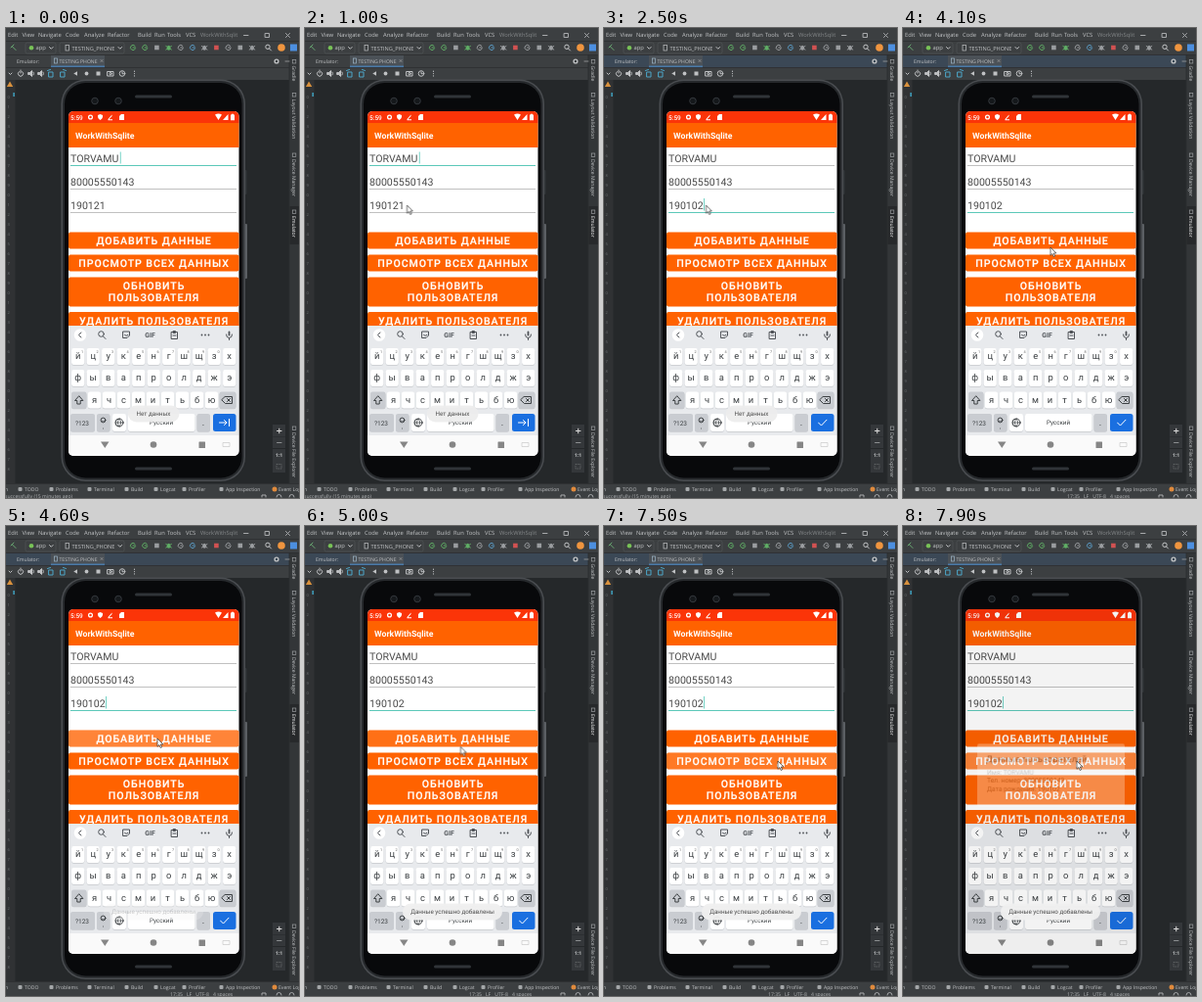
These frames come from a looping animation (300x480 px, 8 s). An HTML page:

```html
<!DOCTYPE html>
<html lang="ru">
<head>
<meta charset="utf-8">
<title>Emulator</title>
<style>
html, body { margin: 0; width: 100%; height: 100%; overflow: hidden; background: #25282a; }
svg { display: block; width: 100vw; height: 100vh; }
text { text-rendering: geometricPrecision; white-space: pre; }
.ide { font: 5.8px "Open Sans", "Noto Sans", sans-serif; fill: #c3c5c7; }
.small { font-size: 5.1px; }
.app { font-family: Roboto, sans-serif; }
.field { font-size: 10.6px; fill: #4a4a4a; }
.btn { font-size: 10.6px; font-weight: 500; letter-spacing: .0893em; fill: #fff; stroke: #fff; stroke-width: .2; text-anchor: middle; }
.key { font-size: 9.4px; fill: #3c4043; text-anchor: middle; }
.hint { font-size: 3.8px; fill: #666; text-anchor: middle; }
.toast { font-size: 6.3px; fill: #444; text-anchor: middle; }
.line { fill: none; stroke-width: 1; stroke-linecap: round; stroke-linejoin: round; }

.anim, .anim * { animation-duration: 8s; animation-iteration-count: infinite; }
.step { animation-timing-function: step-end; }
#date1 { animation-name: date1; }
#date2 { animation-name: date2; }
#date3 { animation-name: date3; }
#date4 { animation-name: date4; }
#date5 { animation-name: date5; }
@keyframes date1 { 0% { opacity: 1 } 20%, 100% { opacity: 0 } }
@keyframes date2 { 0% { opacity: 0 } 20% { opacity: 1 } 22.5%, 100% { opacity: 0 } }
@keyframes date3 { 0% { opacity: 0 } 22.5% { opacity: 1 } 28.75%, 100% { opacity: 0 } }
@keyframes date4 { 0% { opacity: 0 } 28.75% { opacity: 1 } 31.25%, 100% { opacity: 0 } }
@keyframes date5 { 0% { opacity: 0 } 31.25%, 100% { opacity: 1 } }

/* focus moves from the first field to the third */
.before { animation-name: before; }
.after { animation-name: after; }
@keyframes before { 0% { opacity: 1 } 13.75%, 100% { opacity: 0 } }
@keyframes after { 0% { opacity: 0 } 13.75%, 100% { opacity: 1 } }

#nameCaret { animation-name: nameBlink; }
@keyframes nameBlink { 0%, 12.5% { opacity: 1 } 6.25%, 13.75%, 100% { opacity: 0 } }
#dateCaret { animation-name: dateBlink; }
@keyframes dateBlink {
  0%, 37.5%, 50%, 62.5%, 75%, 87.5% { opacity: 0 }
  13.75%, 43.75%, 56.25%, 68.75%, 81.25%, 93.75%, 100% { opacity: 1 }
}
#dateCaret rect { animation-name: caretMove; animation-timing-function: step-end; }
@keyframes caretMove {
  0% { transform: none }
  20% { transform: translateX(-6px) }
  22.5% { transform: translateX(-12px) }
  28.75% { transform: translateX(-6px) }
  31.25%, 100% { transform: none }
}

.smooth { animation-timing-function: linear; }
#press1 { animation-name: press1; }
#press2 { animation-name: press2; }
@keyframes press1 { 0%, 52.5% { opacity: 0 } 56.25%, 58.75% { opacity: .22 } 65%, 100% { opacity: 0 } }
@keyframes press2 { 0%, 91.25% { opacity: 0 } 95%, 100% { opacity: .22 } }
#toast1 { animation-name: toast1; }
#toast2 { animation-name: toast2; }
@keyframes toast1 { 0%, 39% { opacity: .94 } 46%, 100% { opacity: 0 } }
@keyframes toast2 { 0%, 56% { opacity: 0 } 61.5%, 100% { opacity: .95 } }
#dim { animation-name: dim; }
#dialog { animation-name: dialog; transform-origin: 152px 254px; }
@keyframes dim { 0%, 96.25% { opacity: 0 } 100% { opacity: .07 } }
@keyframes dialog { 0%, 96.25% { opacity: 0; transform: scale(.96) } 100% { opacity: .42; transform: none } }

#cursor { animation-name: cursor; animation-timing-function: ease-in-out; }
@keyframes cursor {
  0%, 1.25% { transform: translate(303px, 402px) }
  11.25%, 37.5% { transform: translate(104.5px, 181px) }
  46.25%, 51.25% { transform: translate(151px, 224px) }
  53.75%, 60% { transform: translate(155px, 217px) }
  66.25%, 77.5% { transform: translate(168px, 242px) }
  81.25%, 100% { transform: translate(178px, 240px) }
}
#status1 { animation-name: status1; }
#status2 { animation-name: status2; }
@keyframes status1 { 0% { opacity: 1 } 48.75%, 100% { opacity: 0 } }
@keyframes status2 { 0% { opacity: 0 } 48.75%, 100% { opacity: 1 } }
</style>
</head>
<body>
<svg viewBox="0 0 300 480" preserveAspectRatio="none" class="anim">
  <!-- IDE window -->
  <rect width="300" height="480" fill="#3c3f41"/>
  <rect y="53" width="290" height="412" fill="#25282a"/>
  <rect y="53" width="9" height="412" fill="#303234"/>
  <rect x="290" y="27" width="10" height="438" fill="#333638"/>
  <rect class="after step" y="27.500" width="290" height="13" fill="#3b4856"/>
  <path d="M0 13.500H300M0 27.500H300M0 40.500H290M9.500 53V465M290 27V465M0 465.500H300" stroke="#2c2e30" fill="none" stroke-width=".8"/>
  <rect x="290.500" y="182" width="9.500" height="39" fill="#27292b"/>
  <g id="menu" class="ide"></g>
  <path class="line" stroke="#a9abad" stroke-width=".6" d="M243.500 7.500h4.500M265.500 5.500h4v4h-4zM286.500 5.500l4 4M290.500 5.500l-4 4"/>

  <g class="ide">
    <path class="line" stroke="#6aab73" stroke-width="1.400" d="M10 22.500l-3.500-3.500M5 20l3-3"/>
    <rect x="20" y="15" width="31" height="11" rx="1.500" fill="none" stroke="#565a5c" stroke-width=".6"/>
    <circle cx="26" cy="20.300" r="2.300" fill="#78c257"/>
    <text x="30.500" y="22.300">app</text>
    <rect x="55" y="15" width="66" height="11" rx="1.500" fill="none" stroke="#565a5c" stroke-width=".6"/>
    <rect x="61" y="17.500" width="3.400" height="5.500" fill="none" stroke="#c3c5c7" stroke-width=".7"/>
    <text x="67.500" y="22.500" font-size="5.600">TESTING_PHONE</text>
    <path class="line" stroke="#c3c5c7" stroke-width=".8" d="M44.500 19.500l1.800 1.800l1.800-1.800M115 19.500l1.800 1.800l1.800-1.800"/>
  </g>
  <g id="tools"></g>
  <circle cx="282" cy="20" r="3.800" fill="#f0953f"/>
  <rect x="291" y="16.500" width="7" height="7" fill="#4c8fe0"/>

  <g class="ide small">
    <text x="11" y="35.500">Emulator:</text>
    <rect x="46" y="28" width="55" height="12" fill="#4b5157"/>
    <rect x="46" y="38.500" width="55" height="1.600" fill="#4a7aa8"/>
    <rect x="49.500" y="31" width="3" height="5" fill="none" stroke="#9fb7c8" stroke-width=".7"/>
    <text x="54.500" y="35.500">TESTING PHONE</text>
    <path class="line" stroke="#8b8d8f" stroke-width=".6" d="M97 32.500l2 2M99 32.500l-2 2M286 34h4"/>
    <circle cx="277" cy="34" r="1.900" fill="none" stroke="#bfc1c3" stroke-width="1.400"/>
  </g>
  <g class="line" stroke="#bfc1c3" stroke-width=".8">
    <path d="M3 46l1.500 1.500l1.500-1.500M13.500 44.500a2.600 2.600 0 1 0 3 0M15 43v3"/>
    <path fill="#bfc1c3" d="M23 45.500h1.500l2-2v6l-2-2H23zM33 45.500h1.500l2-2v6l-2-2H33z"/>
    <path d="M28 45q1 1.500 0 3M38 45q1 1.500 0 3"/>
    <path stroke="#4ca6c8" d="M44 45h4v5h-4zM42.500 43.500l3-1M56 45h4v5h-4zM61.500 43.500l-3-1"/>
    <path fill="#bfc1c3" stroke="none" d="M73 44.300l-3.800 2.200l3.800 2.200zM92.500 44.500h4v4h-4z"/>
    <circle cx="82.500" cy="46.500" r="1.900" fill="#bfc1c3" stroke="none"/>
    <path d="M104 44.500h6v4.500h-6z"/><circle cx="107" cy="46.700" r="1.200"/>
    <circle cx="119" cy="46.500" r="2.800"/><path d="M119 45v1.700h1.500"/>
    <path stroke-width="1.200" d="M131.500 44.200v.1M131.500 46.500v.1M131.500 48.800v.1"/>
  </g>

  <g id="gutter" class="ide" style="font-size:4px"></g>
  <path d="M4 54.500l3.200 5.500h-6.400z" fill="#d9913d"/>
  <rect x="7.200" y="66" width="1.800" height="4" fill="#3c8fa8"/>
  <g id="side" class="ide small"></g>
  <g class="ide" text-anchor="middle">
    <path fill="#34373a" d="M273 405h13v12.500h-13zM273 418h13v11h-13zM273 430h13v24h-13z"/>
    <path class="line" stroke="#ddd" d="M277.500 411.500h4.500M279.750 409.200v4.600"/>
    <path class="line" stroke="#8c8f91" d="M277.500 423.500h4.500"/>
    <text x="279.500" y="438" font-size="5" font-weight="700">1:1</text>
    <rect x="277" y="445.500" width="5" height="4.500" fill="none" stroke="#777a7c" stroke-width=".7" stroke-dasharray="1.300 1"/>
  </g>
  <g id="bottom" class="ide small"></g>
  <g class="ide small">
    <text id="status1" class="step" x="-1" y="480" fill="#b4b6b8">successfully (15 minutes ago)</text>
    <text id="status2" class="step" x="168" y="480" fill="#b4b6b8">17:35   LF   UTF-8   4 spaces</text>
    <path class="line" stroke="#a9abad" stroke-width=".8" d="M262 479v-2h4v2M277 479a2.500 2.500 0 0 1 5 0M290 479a2.500 2.500 0 0 1 5 0"/>
  </g>

  <!-- phone -->
  <rect x="244" y="145" width="2.500" height="25" rx="1" fill="#33373a"/>
  <rect x="244.500" y="200" width="2.500" height="56" rx="1" fill="#5b5f63"/>
  <rect x="56.500" y="52.500" width="188.500" height="410.500" rx="25" fill="#4a4d51"/>
  <rect x="58" y="54" width="185.500" height="407.500" rx="23.500" fill="#26292c"/>
  <rect x="60" y="56" width="181.500" height="403.500" rx="21.500" fill="#08090b"/>
  <g fill="#15181b" stroke="#34383d">
    <circle cx="91" cy="74.500" r="3.300"/><circle cx="115" cy="74.500" r="3.300"/>
  </g>
  <g fill="#303438">
    <rect x="132" y="68.500" width="38" height="3" rx="1.500"/>
    <rect x="132" y="448.500" width="38" height="3" rx="1.500"/>
  </g>
  <clipPath id="screen"><rect x="64" y="85" width="174.500" height="352" rx="5"/></clipPath>

  <g class="app" clip-path="url(#screen)">
    <rect x="64" y="85" width="175" height="352" fill="#fff"/>
    <rect x="64" y="85" width="175" height="12" fill="#fb3408"/>
    <rect x="64" y="97" width="175" height="25" fill="#ff6200"/>
    <text x="66" y="93.600" font-size="6.500" font-weight="500" fill="#fff">5:59</text>
    <g fill="#fff">
      <circle cx="86.500" cy="91" r="1.900" fill="none" stroke="#fff" stroke-width="1.300"/>
      <path d="M96.500 88l2.500 1v2q-.5 2-2.500 3q-2-1-2.500-3v-2zM104.500 93l4-4.500v1.500l-3 3.300h3.500v1h-4.500zM116 90l2-2h3v6h-5z"/>
      <path d="M214 88.500q3.500-2 7 0l-3.500 5.500zM227.500 88v6h-5.500zM230 88.500h1v-.8h2v.8h1v5.700h-4z"/>
    </g>
    <text x="71" y="112.500" font-size="8.700" font-weight="700" fill="#fff">WorkWithSqlite</text>

    <path d="M66 140.500H236M66 164.500H236M66 188.500H236" stroke="#b0b0b0" stroke-width=".8"/>
    <g stroke="#52c9b8" stroke-width=".9">
      <path class="before step" d="M66 140.500H236"/>
      <path class="after step" d="M66 188.500H236"/>
    </g>
    <g class="field">
      <text x="66" y="137">TORVAMU</text>
      <text x="66" y="160.700">80005550143</text>
      <text id="date1" class="step" x="66" y="184.500">190121</text>
      <text id="date2" class="step" x="66" y="184.500">19012</text>
      <text id="date3" class="step" x="66" y="184.500">1901</text>
      <text id="date4" class="step" x="66" y="184.500">19010</text>
      <text id="date5" class="step" x="66" y="184.500">190102</text>
    </g>
    <g fill="#52c9b8">
      <rect id="nameCaret" class="step" x="116.800" y="126.500" width=".8" height="12"/>
      <g id="dateCaret" class="step"><rect x="102.200" y="174" width=".8" height="12.500"/></g>
    </g>

    <g fill="#ff6200">
      <rect x="64" y="208.500" width="174.500" height="17" rx="2"/>
      <rect x="64" y="231.500" width="174.500" height="17" rx="2"/>
      <rect x="64" y="254.500" width="174.500" height="30" rx="2"/>
      <rect x="64" y="290" width="174.500" height="17" rx="2"/>
    </g>
    <rect id="press1" class="smooth" x="64" y="208.500" width="174.500" height="17" rx="2" fill="#fff" opacity="0"/>
    <rect id="press2" class="smooth" x="64" y="231.500" width="174.500" height="17" rx="2" fill="#fff" opacity="0"/>
    <g class="btn">
      <text x="151.600" y="221">ДОБАВИТЬ ДАННЫЕ</text>
      <text x="151.600" y="244">ПРОСМОТР ВСЕХ ДАННЫХ</text>
      <text x="151.600" y="266.700">ОБНОВИТЬ</text>
      <text x="151.600" y="279">ПОЛЬЗОВАТЕЛЯ</text>
      <text x="151.600" y="302.800">УДАЛИТЬ ПОЛЬЗОВАТЕЛЯ</text>
    </g>

    <!-- keyboard -->
    <rect x="64" y="304" width="175" height="112" fill="#e8eaed"/>
    <circle cx="76" cy="313.500" r="6.300" fill="#fff"/>
    <g class="line" stroke="#4d5156">
      <path d="M77 311l-2.500 2.500l2.500 2.500M99.500 315l2.500 2.500"/>
      <circle cx="97.500" cy="312.500" r="2.800"/>
      <path d="M120 310h6.500v4l-2.500 2.500h-4zM121.500 313.500q1.500 2 3.500 0M169.500 310.500h6v7h-6zM171.500 309.500h2v2h-2zM171 314h3"/>
      <path stroke-width="1.800" d="M200.500 313.500v.1M204 313.500v.1M207.500 313.500v.1M228.500 310.500v3"/>
      <path d="M225.500 313q0 3.500 3 3.500t3-3.500M228.500 316.500v2"/>
    </g>
    <text x="147.500" y="316" font-size="6.800" font-weight="700" fill="#4d5156" text-anchor="middle">GIF</text>
    <g id="keys"></g>
    <g class="line" stroke="#3c4043">
      <path d="M74.500 376l-4 4.500h2.300v3.500h3.400v-3.500h2.300zM224.500 376.500h7v7h-7l-3.500-3.500zM226.500 378.500l3 3M229.500 378.500l-3 3"/>
      <circle cx="99.500" cy="400.500" r="2.400"/><path stroke-width=".7" d="M98.300 401.300q1.200 1 2.400 0"/>
      <circle cx="116" cy="403" r="4"/><path stroke-width=".7" d="M112 403h8M116 399q-3.500 4 0 8M116 399q3.500 4 0 8"/>
    </g>
    <g class="key">
      <text x="78" y="405.500" font-size="6.500">?123</text>
      <text x="99.500" y="408.500" font-size="6">,</text>
      <text x="159" y="405.300" font-size="6.300">Русский</text>
      <text x="202" y="406">.</text>
    </g>
    <rect x="212" y="394" width="23.500" height="18" rx="2.500" fill="#1a6fe0"/>
    <g class="line" stroke="#fff" stroke-width="1.300">
      <path class="before step" d="M218.500 403h7.500M223.500 400.500l2.500 2.500l-2.500 2.500M228.500 399.500v7"/>
      <path class="after step" d="M219.500 403l3 3l5.500-5.800"/>
    </g>
    <rect x="64" y="416" width="175" height="21" fill="#fafafa"/>
    <g fill="#868686">
      <path d="M97 422.500h8.500l-4.250 6.500z"/><circle cx="151" cy="425.500" r="3.300"/><rect x="197.500" y="422.500" width="6.500" height="6.500" rx=".5"/>
    </g>
    <path d="M222 423.500h7v4h-7z" fill="none" stroke="#d0d0d0" stroke-width=".8"/>

    <rect id="dim" class="smooth" x="64" y="85" width="175" height="352" opacity="0"/>
    <g id="dialog" class="smooth" opacity="0">
      <rect x="75" y="222" width="153" height="65" rx="2" fill="#fff"/>
      <g font-size="6.800" fill="#555">
        <text x="84" y="240.500" font-size="9.400" font-weight="500" fill="#222">Данные пользователей</text>
        <text x="85" y="253.500">Имя: TORVAMU</text>
        <text x="85" y="262">Тел. номер: 80005550143</text>
        <text x="85" y="270.500">Дата рождения: 190102</text>
      </g>
    </g>

    <g id="toast1" class="toast smooth">
      <rect x="125" y="385.500" width="52.500" height="17" rx="8.500" fill="#ededed"/>
      <text x="151" y="396.200">Нет данных</text>
    </g>
    <g id="toast2" class="toast smooth" opacity="0">
      <rect x="100" y="385.500" width="102" height="17" rx="8.500" fill="#f0f0f0"/>
      <text x="151" y="396.300">Данные успешно добавлены</text>
    </g>
  </g>

  <path id="cursor" d="M0 0v8.300l1.900-1.800l1.300 3l1.400-.6l-1.300-2.900h2.600z" fill="#fff" stroke="#333" stroke-width=".7"/>
</svg>

<script>
const put = (id, html) => { document.getElementById(id).innerHTML = html; };
const label = (x, y, s, extra = '') => `<text x="${x}" y="${y}" ${extra}>${s}</text>`;

const menu = { Edit: 2, View: 16.5, Navigate: 33, Code: 61, Analyze: 80, Refactor: 104,
  Build: 135, Run: 152, Tools: 165, VCS: 184 };
put('menu', Object.entries(menu).map(([s, x]) => label(x, 9.3, s)).join('') +
  label(199, 9.3, 'WorkWithSqlit', 'fill="#85888a"'));

const ring = (x, c) => `<path class="line" d="M${x + 2} 18.2a2.6 2.6 0 1 0 .5 2.800M${x} 20h2.500" stroke="${c}"/>`;
const bug = (x, c) => `<ellipse cx="${x}" cy="20.3" rx="1.8" ry="2.500" fill="${c}"/>` +
  `<path class="line" d="M${x - 2.8} 18.500l5.600 3.600M${x + 2.8} 18.500l-5.600 3.600" stroke="${c}" stroke-width=".7"/>`;
const stop = (x, c) => `<rect x="${x - 2.3}" y="17.700" width="4.600" height="4.600" fill="${c}"/>`;
const green = '#5fad65', grey = '#9a9da0';
const tools = [[ring, green], [ring, green], [stop, grey], [bug, green], [ring, grey], [ring, '#5a9bc4'],
  [bug, grey], [stop, '#d25252'], [ring, grey], [stop, grey], [bug, grey]];
put('tools', tools.map(([draw, color], i) => draw(130 + i * 12.2, color)).join('') +
  '<path class="line" stroke="#c3c5c7" d="M269.500 21l2 2"/><circle cx="268" cy="19.300" r="2.200" fill="none" stroke="#c3c5c7"/>');

put('gutter', Array.from({ length: 39 }, (_, i) =>
  label(1.5, 72 + i * 10, i % 10, 'fill="#6c7073"')).join(''));

const side = { Gradle: 38.5, 'Layout Validation': 72.5, 'Device Manager': 134, Emulator: 192, 'Device File Explorer': 413 };
put('side', Object.entries(side).map(([s, y]) =>
  `<g transform="translate(293.300 ${y}) rotate(90)">` +
  label(0, 0, s, s === 'Emulator' ? 'fill="#fff"' : '') +
  '<rect x="-6" y="-3.500" width="3.500" height="3.500" fill="none" stroke="#9a9da0" stroke-width=".7"/></g>').join(''));

const bottom = { TODO: 19, Problems: 51, Terminal: 90, Build: 128, Logcat: 158, Profiler: 187,
  'App Inspection': 225, 'Event Log': 279 };
put('bottom', label(-1, 473, 'n') + Object.entries(bottom).map(([s, x]) =>
  label(x, 473, s) + (s === 'Event Log'
    ? `<circle cx="${x - 4}" cy="471" r="2.500" fill="#e08a3c"/>`
    : `<rect x="${x - 6.5}" y="469" width="4" height="4" rx="1" fill="#a4a7a9"/>`)).join(''));

const key = (x, y, w, h, fill = '#fff') =>
  `<rect x="${x}" y="${y + .8}" width="${w}" height="${h}" rx="2.200" fill="#c6c9cd"/>` +
  `<rect x="${x}" y="${y}" width="${w}" height="${h}" rx="2.200" fill="${fill}"/>`;
const row = (letters, x0, pitch, y, hints = '') => [...letters].map((c, i) => {
  const x = x0 + i * pitch;
  return key(x - 6.6, y, 13.2, 17) + label(x, y + 11.3, c, 'class="key"') +
    (hints[i] ? label(x + 4.3, y + 4.6, hints[i], 'class="hint"') : '');
}).join('');
const dark = '#c9ccd1';
put('keys',
  row('йцукенгшщзх', 73.7, 15.5, 327, '1234567890') +
  row('фывапролджэ', 73.7, 15.5, 349) +
  row('ячсмитьбю', 90.5, 15, 371.5) +
  key(67, 371.5, 15.5, 17, dark) + key(218.5, 371.5, 17, 17, dark) +
  key(66, 394, 25, 18, dark) + key(93, 394, 13.5, 18, dark) + key(109, 394, 14, 18) +
  key(125, 394, 68.5, 18) + key(195.5, 394, 13.5, 18, dark));
</script>
</body>
</html>
```
